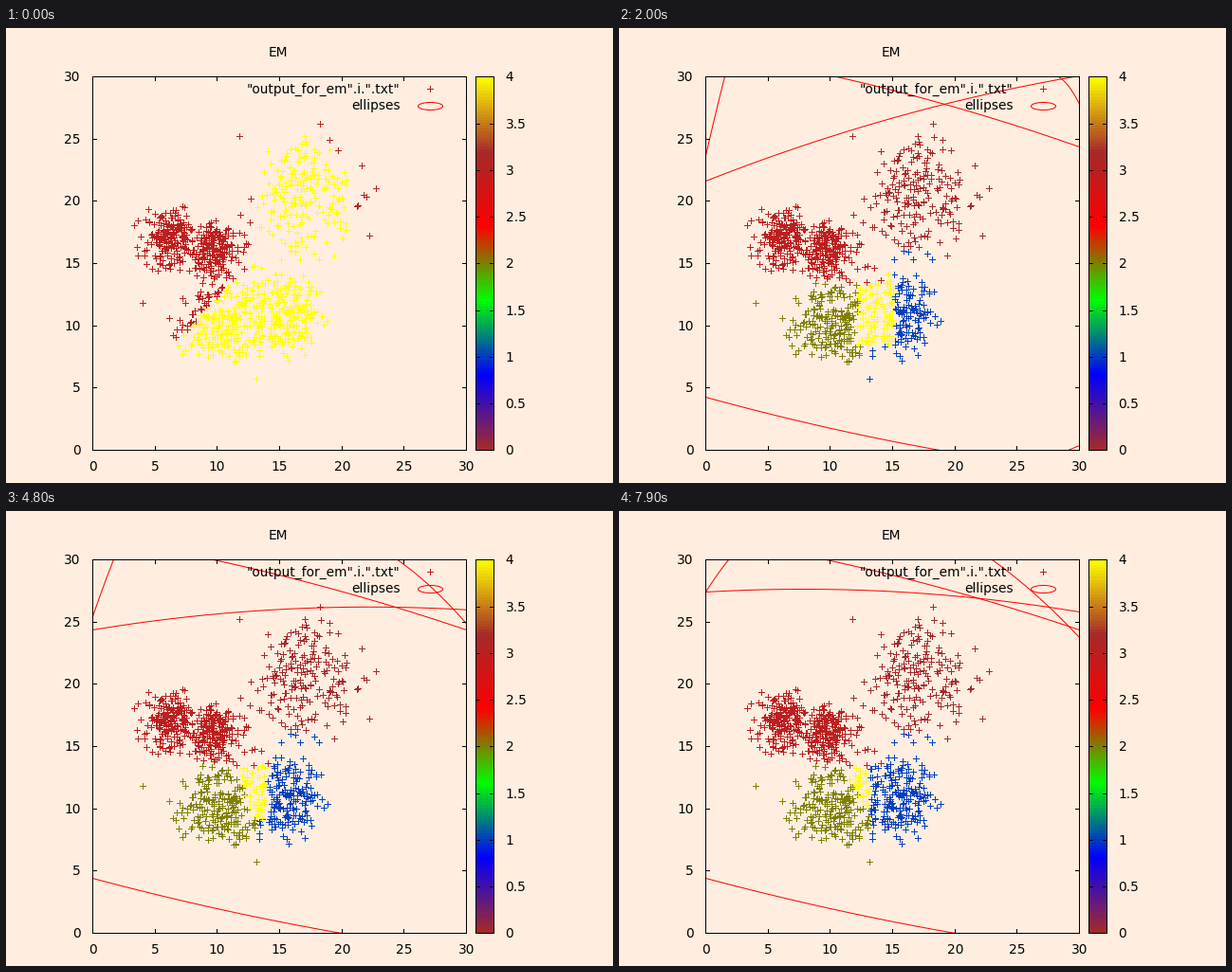
Animation of 640 by 480 pixels, one loop 8 s. Source, as a matplotlib script:

```python
import numpy as np
import matplotlib.pyplot as plt
from matplotlib.animation import FuncAnimation
from matplotlib.patches import Rectangle

DPI = 100
PX = 72 / DPI
plt.rcParams.update({
    "font.family": "DejaVu Sans",
    "font.size": 13.8 * PX,
    "toolbar": "None",
})

LEFT, RIGHT, TOP, BOTTOM = 91, 485, 51, 445
BAR_L, BAR_R = 495, 514
UNIT = (RIGHT - LEFT) / 30
FRAMES, STEP = 80, 100
MIXED, SETTLING, END = 1.3, 2.0, 7.9  # seconds

STOPS = np.array([(165, 42, 42), (0, 0, 255), (0, 255, 0),
                  (255, 0, 0), (165, 42, 42), (255, 255, 0)]) / 255


def palette(value):
    """Colour for a value on the 0..4 scale."""
    pos = np.asarray(value) / 4 * (len(STOPS) - 1)
    return np.stack([np.interp(pos, range(len(STOPS)), c) for c in STOPS.T], -1)


def ease_out(u, power):
    return 1 - (1 - u) ** power


# ---- data: five gaussian clusters and a few stragglers ----
rng = np.random.default_rng(12)


def cluster(n, cx, cy, sx, sy, limit=2.6):
    z = rng.normal(size=(2 * n, 2))
    z = z[np.hypot(*z.T) < limit][:n]
    return z * (sx, sy) + (cx, cy)


points = np.vstack([
    cluster(200, 6.1, 17, 1.15, 1.1),
    cluster(205, 9.9, 16, 1.1, 1),
    cluster(195, 17.2, 20.3, 2.15, 2.2),
    cluster(235, 10.3, 10.3, 1.7, 1.6),
    cluster(225, 15.2, 11.1, 1.6, 1.75),
    [(11.8, 25.2), (18.3, 26.2), (22.8, 21), (22.2, 17.2),
     (4, 11.8), (13.2, 5.7)]])
X, Y = points.T


# ---- cluster labels over time ----
def first_labels():
    left = np.minimum(7 + .93 * (Y - 9), 12.6 + .1 * (Y - 15))
    right = 21.4 - .06 * np.clip(Y - 18, 0, None) ** 2
    return np.where((X > left) & (X < right), 4, 3)


def upper_right(slope):
    floor = 16.1 - slope * np.clip(X - 17, 0, None)
    return (X + .5 * (Y - 15) > 13.2) & (Y > floor)


def mixed_labels():
    olive = Y < np.minimum(11.15, 11 - .65 * (X - 8))
    middle = X < 13.2 + .2 * (Y - 9)
    low = Y < np.minimum(9 + .6 * (X - 15.2), 10.7)
    blue = (X > 15) & (low | (Y > 13))
    return np.select([upper_right(0), olive, middle, X > 18.6, blue],
                     [0, 2, 3, 4, 1], 4)


def settled_labels(t):
    """The yellow band narrows between olive and blue."""
    u = max(0, (t - SETTLING) / (END - SETTLING))
    s = ease_out(u, 1.4)
    band_left = 12.2 - .45 * s * (Y - 11)
    band_right = 15.1 - 1.9 * s
    below = Y < 8.4 + 1.7 * u
    red = (Y > 13.45) & (X < 14.3)
    pocket = (X > 18.6 + 10 * u) & (Y > 11)
    return np.select(
        [upper_right(.4), red, pocket, X > band_right,
         below & (X > 13 + .4 * s), below | (X < band_left)],
        [0, 3, 4, 1, 1, 2], 4)


FIRST, MIXED_SET = first_labels(), mixed_labels()


def labels(t):
    """Fronts sweep in from the upper right, then from the lower left."""
    if t <= MIXED:
        return np.where(np.hypot(X - 21, Y - 26) < 26 * t, MIXED_SET, FIRST)
    front = np.hypot(X - 9, Y - 8) < 20 * (t - MIXED)
    return np.where(front | (t >= SETTLING), settled_labels(t), MIXED_SET)


# ---- ellipse arcs ----
# edges crossed; where at MIXED, SETTLING and END; easing powers; bend
ARCS = [
    ("LT", (234, 155), (134, 111), (85, 115), (1, 1), -1),
    ("LR", (114, -322), (161, 50), (85, 106), (1, 5), -11),
    ("TR", (485, 51), (229, 125), (218, 125), (5, 5), -4),
    ("TR", (485, 51), (463, 80), (393, 133), (2, 2), -4),
    ("LB", (445, 91), (389, 338), (387, 354), (5, 5), 3),
    ("BR", (485, 445), (473, 440), (485, 445), (5, 5), 0),
]
EDGES = {"L": lambda v: (LEFT, v), "R": lambda v: (RIGHT, v),
         "T": lambda v: (v, TOP), "B": lambda v: (v, BOTTOM)}


def arc(t, edges, early, middle, late, powers, bend):
    early, middle, late = map(np.array, (early, middle, late))
    grow = np.clip((t - MIXED) / (SETTLING - MIXED), 0, 1)
    u = max(0, (t - SETTLING) / (END - SETTLING))
    ends = (early + (middle - early) * grow
            + (late - middle) * ease_out(u, np.array(powers)))
    a, b = (np.array(EDGES[e](v)) for e, v in zip(edges, ends))
    w = np.linspace(0, 1, 40)[:, None]
    return (a + (b - a) * w + 4 * w * (1 - w) * (0, bend * grow) + .5).T


# ---- stage ----
fig = plt.figure(figsize=(640 / DPI, 480 / DPI), dpi=DPI, facecolor="#ffeee0")
ax = fig.add_axes([0, 0, 1, 1])
ax.axis("off")

ax.imshow(palette(np.linspace(4, 0, 128))[:, None], aspect="auto",
          interpolation="nearest", extent=(BAR_L, BAR_R, BOTTOM, TOP))
ax.set(xlim=(0, 640), ylim=(480, 0))


def line(xs, ys):
    ax.plot(xs, ys, color="black", lw=PX, antialiased=False, zorder=6,
            solid_capstyle="projecting", solid_joinstyle="miter")


def red_curve(xs, ys):
    return ax.plot(xs, ys, color="red", lw=PX, zorder=4, snap=False)[0]


def box(x0, x1):
    line([x0, x1, x1, x0, x0], [TOP, TOP, BOTTOM, BOTTOM, TOP])


def side_ticks(x0, x1, y, size=4):
    line([x0, x0 + size], [y, y])
    line([x1 - size, x1], [y, y])


def text(x, y, s, ha):
    ax.text(x, y, s, ha=ha, va="baseline", zorder=7)


def crosses(xs, ys, colors):
    return ax.scatter(xs, ys, s=(6 * PX) ** 2, marker="+", c=colors,
                      linewidths=PX, antialiased=False, zorder=3,
                      capstyle="projecting")


box(LEFT, RIGHT)
box(BAR_L, BAR_R)
for v in range(0, 31, 5):
    x, y = round(LEFT + v * UNIT), round(BOTTOM - v * UNIT)
    side_ticks(LEFT, RIGHT, y)
    line([x, x], [TOP, TOP + 4])
    line([x, x], [BOTTOM - 4, BOTTOM])
    text(78.5, y + 5, str(v), "right")
    text(x + .5, 467, str(v), "center")
for i in range(9):
    y = BOTTOM - i * (BOTTOM - TOP) // 8
    side_ticks(BAR_L, BAR_R, y)
    text(526.5, y + 5, f"{i / 2:g}", "left")

text(286.5, 30, "EM", "center")
text(415.5, 69, '"output_for_em".i.".txt"', "right")
text(415.5, 86, "ellipses", "right")
crosses([447], [64], [palette(3)])
angle = np.linspace(0, 2 * np.pi, 60)
red_curve(447.5 + 13 * np.cos(angle), 82.5 + 4 * np.sin(angle))

cloud = crosses(np.round(LEFT + X * UNIT), np.round(BOTTOM - Y * UNIT),
                palette(FIRST))
plot_area = Rectangle((LEFT, TOP), RIGHT - LEFT, BOTTOM - TOP,
                      transform=ax.transData)
curves = [red_curve([], []) for _ in ARCS]
for curve in curves:
    curve.set_clip_path(plot_area)


def update(i):
    t = i * STEP / 1000
    cloud.set_edgecolor(palette(labels(t)))
    for curve, spec in zip(curves, ARCS):
        curve.set_visible(t >= 1)
        curve.set_data(*arc(t, *spec))
    return [cloud, *curves]


anim = FuncAnimation(fig, update, frames=FRAMES, interval=STEP,
                     repeat=True, repeat_delay=0, blit=False)
plt.show()
```
